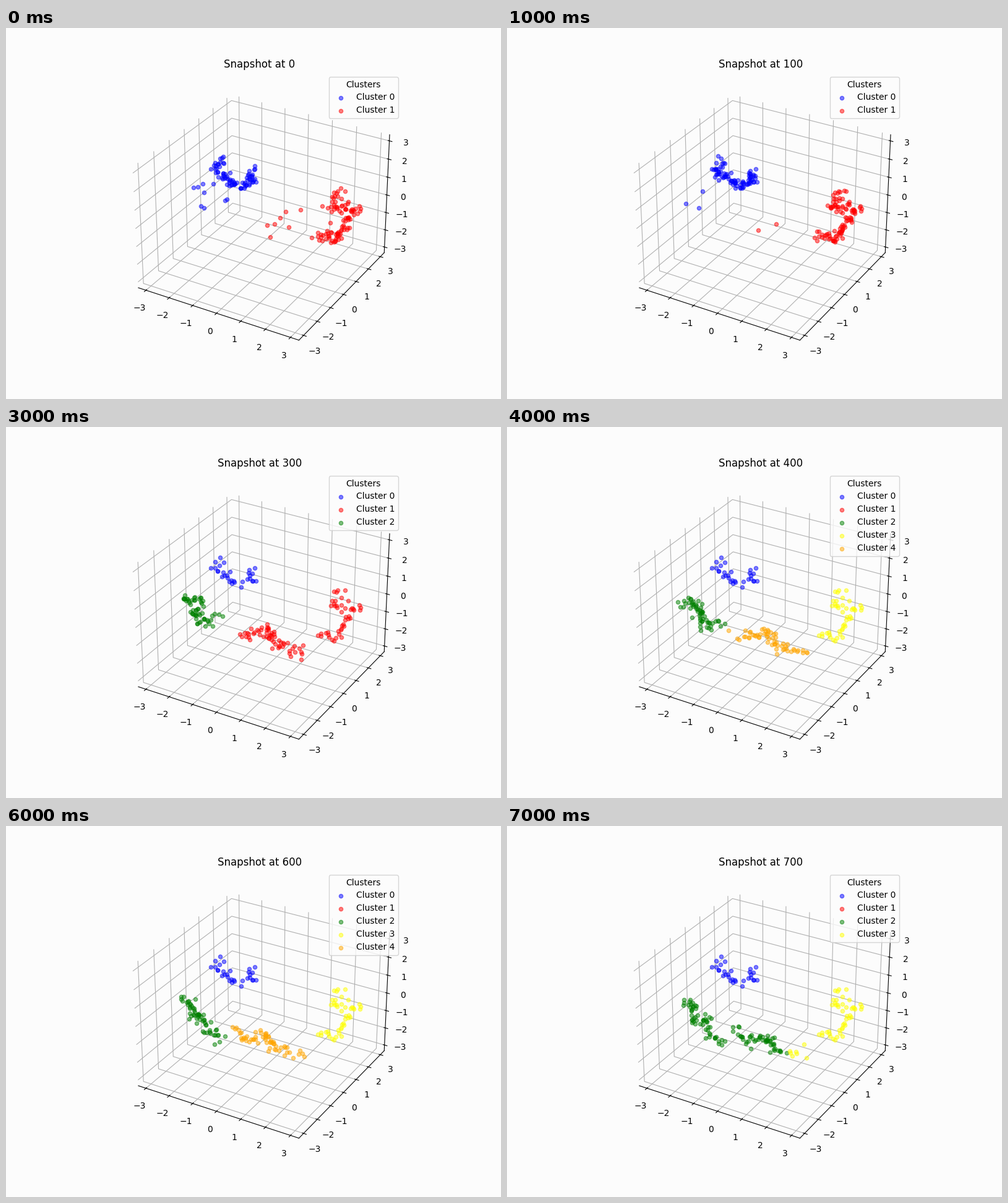
A matplotlib script that plays this animation: 800 by 600 pixels, repeating every 8000 ms.

```python
import numpy as np
import matplotlib.pyplot as plt
from matplotlib.animation import FuncAnimation

BG = "#fcfcfc"
CLEAR = (1, 1, 1, 0)
COLORS = ["blue", "red", "green", "yellow", "orange"]
COUNTS = [2, 2, 2, 3, 5, 5, 5, 4]  # clusters per snapshot
LIMIT = 10 / 3

# Camera basis and box half sizes of the default 3D view
RIGHT = np.array([np.sqrt(3) / 2, 0.5, 0])
UP = np.array([-0.25, np.sqrt(3) / 4, np.sqrt(3) / 2])
HALF = np.array([25 / 42, 25 / 42, 25 / 56])
SCALE = 462 / 0.185 / 10
ORIGIN = np.array([416.24, 296.76])

# Spines of each swarm in pixels: at home, on arrival and settled
WEST = [
    [(350, 212), (339, 232), (358, 243), (376, 254), (396, 248), (396, 231)],
    [(284, 278), (300, 277), (318, 288), (300, 305), (318, 316), (345, 296)],
    [(285, 286), (302, 290), (300, 315), (322, 310), (326, 337), (354, 350)],
]
EAST = [
    [(545, 258), (522, 291), (566, 290), (548, 318), (534, 341), (503, 333)],
    [(378, 339), (410, 328), (427, 330), (430, 350), (455, 354), (487, 366)],
    [(366, 324), (385, 350), (412, 340), (424, 347), (434, 363), (484, 366)],
]


def along(spine, t):
    knots = np.linspace(0, 1, len(spine))
    return np.column_stack([np.interp(t, knots, c) for c in zip(*spine)])


def spread(n, rng):
    """Even places along a spine and the scatter around it."""
    return (np.arange(n) + rng.random(n)) / n, rng.normal(0, 4.5, (n, 2))


def still(spines, n, seed):
    t, jitter = spread(n, np.random.default_rng(seed))
    return along(spines[0], t) + jitter


def drift(spines, n, step):
    """Leave home slowly, a few particles ahead, then creep to rest."""
    rng = np.random.default_rng(step + 40)
    t, jitter = spread(n, rng)
    time = step + 3 * rng.random(n) ** 6
    go = np.clip(time / 3, 0, 1)[:, None] ** 4
    settle = np.clip((time - 3) / 4, 0, 1)[:, None]
    home, arrival, rest = (along(s, t) for s in spines)
    goal = arrival + (rest - arrival) * settle
    return home + (goal - home) * go + jitter


def clusters(step):
    west, east = drift(WEST, 56, step), drift(EAST, 58, step)
    members = [[] for _ in COLORS]
    members[0].append(still(WEST, 31, 3))
    members[1 if step < 4 else 3].append(still(EAST, 46, 8))
    members[0 if step < 3 else 2].append(west)
    if step < 7:
        members[1 if step < 4 else 4].append(east)
    else:
        # The bottom swarm splits between its two neighbours
        far = east[:, 0] > 454
        members[2].append(east[~far])
        members[3].append(east[far])
    return [np.concatenate(m) if m else np.empty((0, 2))
            for m in members[:COUNTS[step]]]


def to_data(pixels):
    """Data coordinates on the camera-facing plane through the centre."""
    flat = (pixels - ORIGIN) * (1, -1) / SCALE
    return (flat @ np.array([RIGHT, UP]) / HALF * LIMIT).T


fig = plt.figure(figsize=(8, 6), dpi=100, facecolor=BG)
ax = fig.add_subplot(projection="3d", facecolor=BG)
ax.set(xlim=(-LIMIT, LIMIT), ylim=(-LIMIT, LIMIT), zlim=(-LIMIT, LIMIT))
for axis in (ax.xaxis, ax.yaxis, ax.zaxis):
    axis.set_pane_color(CLEAR)
    axis.set_ticks(range(-3, 4))
ax.yaxis.pane.set_edgecolor("0.93")


def draw(step):
    for old in list(ax.collections):
        old.remove()
    for i, pixels in enumerate(clusters(step)):
        ax.scatter(*to_data(pixels), color=COLORS[i], alpha=0.5,
                   depthshade=False, label=f"Cluster {i}")
    ax.set_title(f"Snapshot at {step * 100}")
    ax.legend(title="Clusters", loc="upper right", facecolor=BG)
    return []


anim = FuncAnimation(fig, draw, frames=len(COUNTS), init_func=lambda: draw(0),
                     interval=1000, repeat=True, repeat_delay=0)
plt.show()
```
